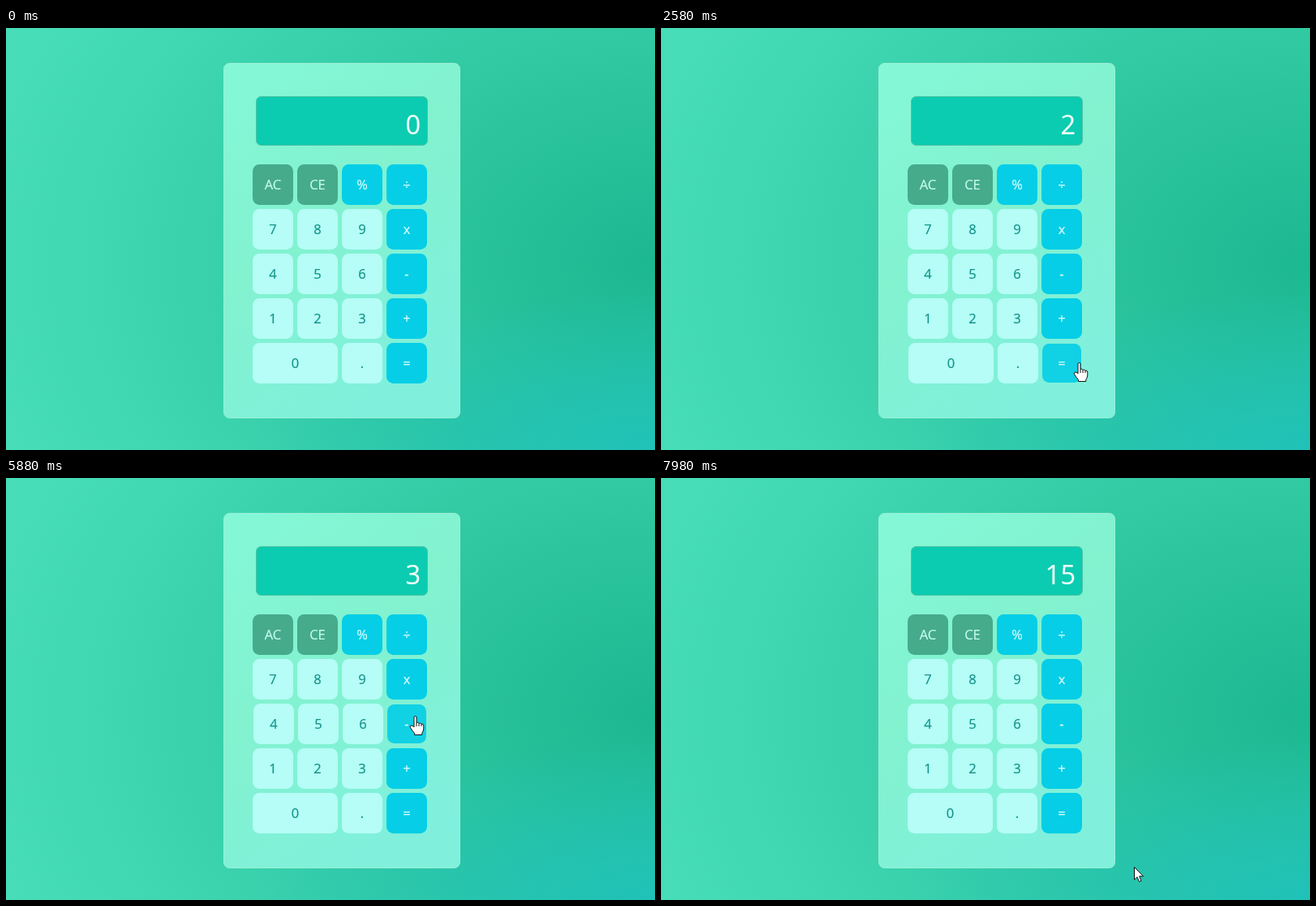
Recreate the animation shown at these times as an HTML page. Size 800 px wide and 520 px high, loop 8 s.

```html
<!DOCTYPE html>
<html lang="en">
<head>
<meta charset="utf-8">
<title>Calculator</title>
<style>
  html, body { margin: 0; width: 100%; height: 100%; overflow: hidden; }
  body {
    background:
      radial-gradient(ellipse 500px 200px at 800px 520px, #20c1b8, #20c1b800),
      radial-gradient(ellipse 850px 620px at 800px 290px, #1cb891, #2ec79f 40%, #39d1ac 65%, #47ddb9);
  }
  svg { display: block; width: 800px; height: 520px; }
  text { font-family: "Open Sans", "Noto Sans", sans-serif; stroke: currentColor; stroke-width: .2px; fill: currentColor; }
  .key text { font-size: 16.5px; text-anchor: middle; }
  .num rect { fill: #b5fdf6; }
  .num { color: #12938a; }
  .op rect { fill: #05cee6; }
  .op { color: #dcfdfd; }
  .clear rect { fill: #46ab8b; }
  .clear { color: #c5fdf0; }
  #out { font-size: 32.5px; text-anchor: end; color: #f2fffc; }
  #cursor path { fill: #fff; stroke: #111; stroke-linejoin: round; }
</style>
</head>
<body>
<svg viewBox="0 0 800 520">
  <defs>
    <linearGradient id="glass" x1="0" y1="0" x2=".55" y2="1">
      <stop offset="0" stop-color="#84f8d7"/>
      <stop offset=".5" stop-color="#82f2cf"/>
      <stop offset="1" stop-color="#80f0dc"/>
    </linearGradient>
  </defs>
  <rect x="268.5" y="43.5" width="291" height="437" rx="7" fill="url(#glass)" stroke="#98efd4"/>
  <rect x="308.5" y="84.5" width="211" height="60" rx="6" fill="#0bccb0" stroke="#4ec2a5"/>
  <text id="out" x="511" y="130.5">0</text>
  <g id="keys"></g>
  <g id="cursor">
    <g id="hand">
      <path d="M-2 14V2Q-2 .5-.5 .5Q1 .5 1 2V8.5Q2.8 7.5 4 9.3Q5.8 8.6 7 10.2Q9.6 9.6 9.8 12V16Q9.6 19 7.8 21.3V23.5H-1.5V21.5Q-4.2 18.5-6.6 14.5Q-7.2 12.2-5.2 12Q-3.6 12-2 14Z"/>
      <path d="M1 8.5V13M4 9.5V13M7 10.5V13" style="fill:none"/>
    </g>
    <path id="arrow" d="M.5 .5V16L4 12.7L6.5 18.5L9 17.4L6.6 11.8H11.5Z"/>
  </g>
</svg>
<script>
const LOOP = 8000, STEP = 55, SIZE = 50, HOLD = 100, SETTLE = 120;
const $ = id => document.getElementById(id);

function set(el, attrs) {
  for (const name in attrs) el.setAttribute(name, attrs[name]);
  return el;
}
function add(parent, tag, attrs) {
  return parent.appendChild(set(document.createElementNS('http://www.w3.org/2000/svg', tag), attrs));
}

const keys = [];
['AC CE % ÷', '7 8 9 x', '4 5 6 -', '1 2 3 +', '0 . ='].forEach((line, row) => {
  let x = 304;
  line.split(' ').forEach((label, col) => {
    const w = label === '0' ? SIZE + STEP : SIZE, y = 168 + row * STEP;
    const kind = row === 0 && col < 2 ? 'clear' : /[\d.]/.test(label) ? 'num' : 'op';
    const g = add($('keys'), 'g', { class: 'key ' + kind });
    const box = add(g, 'rect', { rx: 8.5 });
    add(g, 'text', { x: x + w / 2, y: y + 31 }).textContent = label;
    keys.push({ label, row, x, y, w, g, box });
    x += w + 5;
  });
});

// The pointer's stops: end time, place, key clicked there.
// A slipped click presses the key without counting.
const stop = (t, x, y, key, slipped) => ({ t, x, y, key, slipped, arrive: key ? t - SETTLE : t });
const stops = [
  stop(70, 717, 505),
  stop(900, 383, 351, '2'), stop(1470, 503, 352, '+'),
  stop(1880, 374, 350, '2'), stop(2600, 516, 412, '='),
  stop(2980, 504, 413),
  stop(3710, 503, 318, '-'), stop(4100, 440, 350, '3'),
  stop(4570, 511, 412, '='), stop(4990, 440, 352, '3'),
  stop(5200, 507, 490),
  stop(5970, 505, 293, '-', true), stop(6500, 500, 246, 'x'),
  stop(6990, 387, 317, '5'), stop(7620, 502, 412, '='),
  stop(7960, 583, 479)
];

const apply = {
  '+': (a, b) => a + b,
  '-': (a, b) => a - b,
  'x': (a, b) => a * b
};

function displayAt(t) {
  let shown = 0, left = 0, op = null, fresh = true;
  for (const s of stops) {
    if (s.t > t) break;
    if (!s.key || s.slipped) continue;
    if (s.key === '=') {
      shown = apply[op](left, shown);
      fresh = true;
    } else if (apply[s.key]) {
      left = shown;
      op = s.key;
      shown = 0;
    } else {
      shown = (fresh ? 0 : shown * 10) + Number(s.key);
      fresh = false;
    }
  }
  return shown;
}

// Longer ways take longer; the pointer rests until it has to leave.
function pointerAt(t) {
  const i = stops.findIndex(s => s.arrive > t);
  if (i === 0) return null;
  if (i < 0) return stops[stops.length - 1];
  const a = stops[i - 1], b = stops[i];
  const dist = Math.hypot(b.x - a.x, b.y - a.y);
  const travel = Math.min(b.arrive - a.t, 150 + 1.6 * dist);
  const u = Math.max(0, 1 - (b.arrive - t) / travel);
  const k = u * u * (3 - 2 * u);
  return { x: Math.round(a.x + (b.x - a.x) * k), y: Math.round(a.y + (b.y - a.y) * k) };
}

function drawKeys(t) {
  const press = stops.find(s => s.key && t >= s.t - HOLD && t < s.t);
  const down = press && keys.find(k => k.label === press.key);
  for (const k of keys) {
    const inset = k === down ? 1 : 0;
    // a pressed key is smaller, so its centred row closes up around it
    const dx = down && k.row === down.row ? Math.sign(down.x - k.x) : 0;
    set(k.g, { transform: `translate(${dx})`, opacity: inset ? .9 : 1 });
    set(k.box, { x: k.x + inset, y: k.y + inset, width: k.w - 2 * inset, height: SIZE - 2 * inset });
  }
}

function drawCursor(t) {
  const p = pointerAt(t);
  $('cursor').style.display = p ? '' : 'none';
  if (!p) return;
  const over = keys.some(k => p.x >= k.x && p.x < k.x + k.w && p.y >= k.y && p.y < k.y + SIZE);
  $('hand').style.display = over ? '' : 'none';
  $('arrow').style.display = over ? 'none' : '';
  set($('cursor'), { transform: `translate(${p.x} ${p.y})` });
}

const start = performance.now();
function frame() {
  const t = (performance.now() - start) % LOOP;
  $('out').textContent = displayAt(t);
  drawKeys(t);
  drawCursor(t);
  requestAnimationFrame(frame);
}
frame();
</script>
</body>
</html>
```
